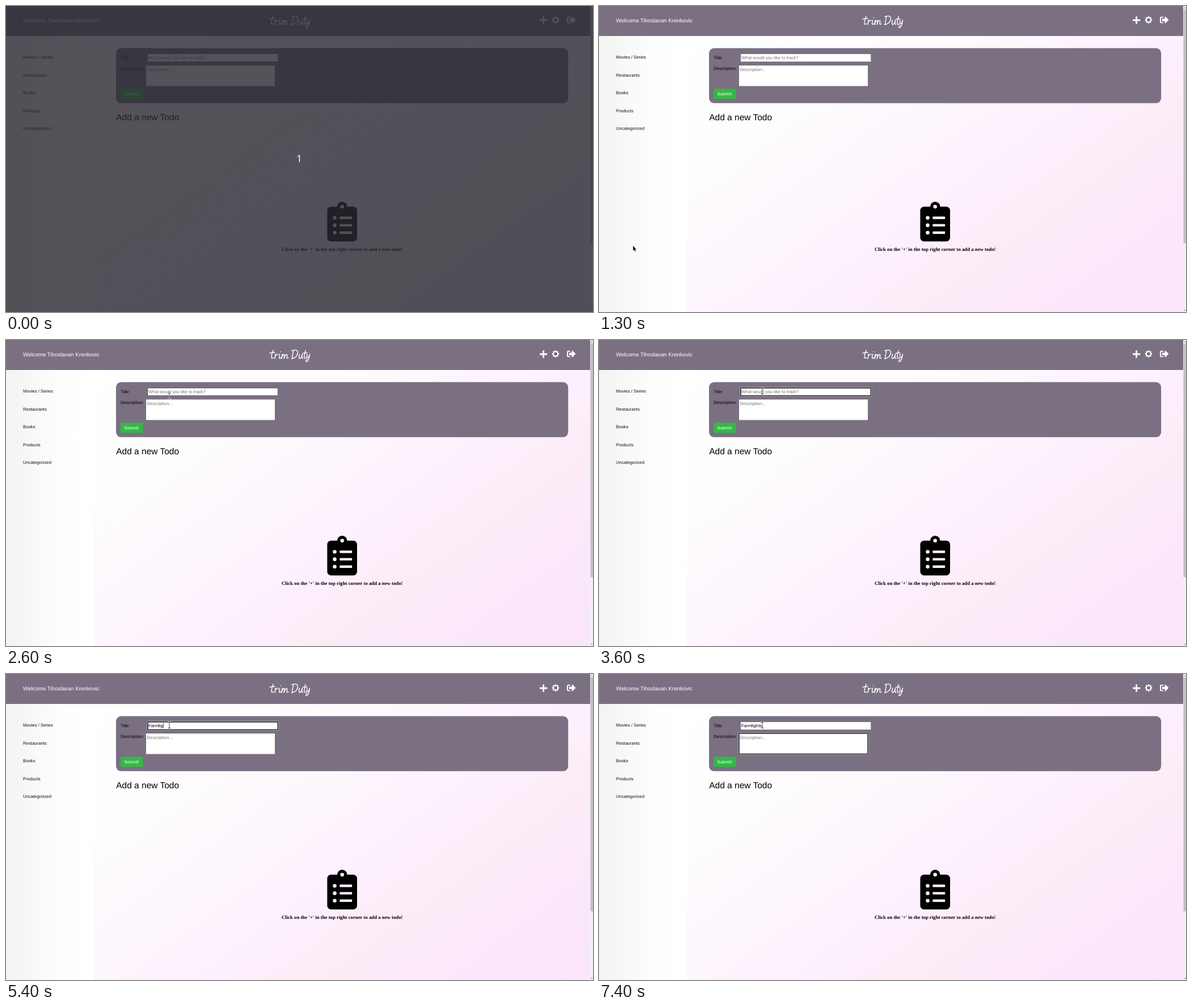
Animation of 1035 by 541 pixels, one loop 8000 ms. Source, as an HTML page with a canvas:

```html
<!DOCTYPE html>
<html lang="en">
<head>
<meta charset="utf-8">
<title>Todo form</title>
<style>
  html, body { margin: 0; width: 100%; height: 100%; overflow: hidden; }
  canvas { display: block; width: 1035px; height: 541px; }
</style>
</head>
<body>
<canvas id="stage" role="img" aria-label="trim Duty: adding a new todo"></canvas>
<script>
const W = 1035, H = 541, LOOP = 8000, STEP = 100;
const SANS = '"Liberation Sans", Arial, sans-serif';
const SERIF = '"Liberation Serif", "Times New Roman", serif';
const PURPLE = '#7a7082';
const BODY = 7.76;

const canvas = document.getElementById('stage');
const ctx = canvas.getContext('2d');
const dpr = window.devicePixelRatio || 1;
canvas.width = Math.round(W * dpr);
canvas.height = Math.round(H * dpr);

const field = { x: 250, y: 85, w: 229.3, h: 13.3 };
const area = { x: 247, y: 105.2, w: 227, h: 36.2 };
const title = 'Farmlights';
const keyTimes = [4300, 4600, 4700, 4900, 5100, 5200, 5400, 5900, 6100, 6300];
const FOCUS = 2900, TAB = 6900;

// Pointer path: time, x, y
const pointer = [
  [1300, 60, 424], [1400, 204, 420], [1500, 194, 418], [1600, 194, 418],
  [1900, 211, 321], [2000, 211, 321], [2600, 288, 99], [2900, 288, 90.5]
];

const wordmark = [
  'M471 18Q468 26 468 31Q469 34 472 31M465 23L474 22',
  'M475 25Q475 29 474 33M475 28Q478 24 480 25.5',
  'M482.5 25Q481 31 482 32.5Q483 33 484.5 31M484 20.5l.3 .3',
  'M487 25L485.8 33Q488 25 490.5 25.5Q491.5 27 490 33Q492.5 25 495 25.5Q496.5 27 495 31Q495 34 498 31.5',
  'M507 18Q505 26 504.5 33M504 19Q513 15.5 514.5 21Q514.5 31 503.5 33.2',
  'M517.5 25Q515.5 33 518 32.8Q521 32 522.5 25Q521 33 523.5 32.5',
  'M528 18.5Q525.5 28 526 31.5Q527 34 529 31.5M523.5 23.5L531 22.5',
  'M531 25Q529.5 32 532 31.5Q534.5 30 535.5 25Q534 37 530 38.5Q527 38 531 34'
].map(d => new Path2D(d));

const arrow = new Path2D('M0 0V8.6L2 6.8L3.5 10L4.9 9.4L3.4 6.3H6Z');
const beam = new Path2D('M-1.8 -5H1.8M0 -5V5M-1.8 5H1.8');
const exitIcon = new Path2D(
  'M497 273L329 441Q288 470 288 424V328H152Q128 328 128 304V208Q128 184 152 184H288V88Q288 42 329 71L497 239Q512 256 497 273Z' +
  'M180 448Q192 448 192 436V396Q192 384 180 384H96Q64 384 64 352V160Q64 128 96 128H180Q192 128 192 116V76Q192 64 180 64H96Q0 64 0 160V352Q0 448 96 448Z');

function clipboardPath() {
  const p = new Path2D('M48 64H128A64 64 0 0 1 256 64H336A48 48 0 0 1 384 112V464A48 48 0 0 1 336 512H48A48 48 0 0 1 0 464V112A48 48 0 0 1 48 64Z');
  const hole = (x, y) => { p.moveTo(x + 24, y); p.arc(x, y, 24, 0, 7); p.closePath(); };
  hole(192, 64);
  for (const y of [208, 304, 400]) {
    hole(96, y);
    p.roundRect(160, y - 16, 160, 32, 8);
  }
  return p;
}
const clipboard = clipboardPath();

function text(str, x, y, size = BODY, color = '#000', family = SANS, weight = '') {
  ctx.font = `${weight} ${size}px ${family}`;
  ctx.fillStyle = color;
  ctx.fillText(str, x, y);
}

function rect(x, y, w, h, color, r = 0) {
  ctx.fillStyle = color;
  ctx.beginPath();
  ctx.roundRect(x, y, w, h, r);
  ctx.fill();
}

function gradient(x0, y0, x1, y1, stops) {
  const g = ctx.createLinearGradient(x0, y0, x1, y1);
  stops.forEach(([at, color]) => g.addColorStop(at, color));
  return g;
}

function placed(x, y, scale, draw) {
  ctx.save();
  ctx.translate(x, y);
  ctx.scale(scale, scale);
  draw();
  ctx.restore();
}

function drawBackground() {
  rect(0, 0, W, H, gradient(287, -44, 897, 790, [
    [0, '#ffffff'], [0.25, '#fefbfd'], [0.5, '#fdf0fe'],
    [0.6, '#fcecf6'], [0.75, '#fbe7fb'], [1, '#fae3fc']
  ]));
  rect(0, 53, 155, H - 53, gradient(0, 0, 155, 0, [
    [0, '#f3f4f2'], [0.65, '#fefefd'], [1, '#ffffff']
  ]));
}

function drawGear(x, y) {
  ctx.save();
  ctx.translate(x, y);
  ctx.lineCap = 'butt';
  ctx.lineWidth = 2;
  ctx.beginPath();
  ctx.arc(0, 0, 4, 0, 7);
  ctx.stroke();
  ctx.lineWidth = 2.3;
  for (let i = 0; i < 8; i++) {
    ctx.beginPath();
    ctx.moveTo(0, -4.2);
    ctx.lineTo(0, -6.3);
    ctx.stroke();
    ctx.rotate(Math.PI / 4);
  }
  ctx.restore();
}

function drawHeader() {
  rect(0, 0, 1030, 53, PURPLE);
  text('Welcome Tihoslavan Krenkovic', 30, 28.7, 9.72, '#fff');
  ctx.strokeStyle = '#fff';
  ctx.lineWidth = 1.4;
  ctx.lineCap = ctx.lineJoin = 'round';
  wordmark.forEach(p => ctx.stroke(p));
  rect(941, 23.5, 13.4, 2.9, '#fff', 0.9);
  rect(946.2, 18.3, 2.9, 13.4, '#fff', 0.9);
  drawGear(969, 24.6);
  placed(989, 16.8, 0.0303, () => ctx.fill(exitIcon));
}

function drawScrollbar() {
  rect(1030, 0, 5, H, '#f1f1f1');
  rect(1030.5, 6, 4.5, 413.5, '#c1c1c1');
  ctx.fillStyle = '#505050';
  ctx.fill(new Path2D('M1031.3 4L1032.7 2.4L1034.1 4ZM1031.3 537.5L1032.7 539.1L1034.1 537.5Z'));
}

function drawBox(b, focused, hovered) {
  if (focused) {
    rect(b.x - 1.4, b.y - 1.4, b.w + 2.8, b.h + 2.8, '#fff', 2);
    rect(b.x - 0.9, b.y - 0.9, b.w + 1.8, b.h + 1.8, '#101014', 1.5);
    rect(b.x + 0.6, b.y + 0.6, b.w - 1.2, b.h - 1.2, '#fff', 0.5);
    return;
  }
  rect(b.x, b.y, b.w, b.h, '#fff');
  if (hovered) {
    ctx.strokeStyle = '#333';
    ctx.lineWidth = 0.6;
    ctx.strokeRect(b.x, b.y, b.w, b.h);
  }
}

function drawCaret(x, y) {
  rect(x, y, 0.7, 9, '#000');
}

function drawForm(t) {
  const inTitle = t >= FOCUS && t < TAB;
  const inArea = t >= TAB;
  const typed = title.slice(0, keyTimes.filter(k => t >= k).length);

  rect(194, 74.5, 797.2, 97.3, PURPLE, 9);
  text('Title:', 202, 94);
  text('Description:', 202, 113);
  drawBox(field, inTitle, t >= 2600 && t < FOCUS);
  drawBox(area, inArea);
  if (typed) text(typed, 251, 94);
  else text('What would you like to track?', 251, 94, BODY, '#757575');
  text('Description...', 248.5, 114.8, BODY, '#757575');

  if (inTitle && (t < 3600 || t >= 4200)) {
    ctx.font = `${BODY}px ${SANS}`;
    drawCaret(251.1 + ctx.measureText(typed).width, 87);
  }
  if (inArea && t < 7400) drawCaret(248.2, 108);

  rect(202, 146.3, 39.6, 18, '#33b846', 2.5);
  text('Submit!', 208.2, 158, BODY, '#fff');
}

function drawPage(t) {
  drawBackground();
  drawHeader();
  ['Movies / Series', 'Restaurants', 'Books', 'Products', 'Uncategorized']
    .forEach((label, i) => text(label, 30, 93 + 31.5 * i, BODY, '#111'));
  drawForm(t);
  text('Add a new Todo', 194.2, 202.4, 15.5);
  placed(566.4, 346, 0.137, () => ctx.fill(clipboard, 'evenodd'));
  ctx.textAlign = 'center';
  text("Click on the '+' in the top right corner to add a new todo!", 592.7, 433, 8.76, '#000', SERIF, 'bold');
  ctx.textAlign = 'left';
  drawScrollbar();
}

function pointerAt(t) {
  const next = pointer.findIndex(p => p[0] > t);
  if (next < 0) return pointer[pointer.length - 1].slice(1);
  const [t0, x0, y0] = pointer[next - 1];
  const [t1, x1, y1] = pointer[next];
  const k = (t - t0) / (t1 - t0);
  return [x0 + (x1 - x0) * k, y0 + (y1 - y0) * k];
}

function drawPointer(t) {
  if (t < pointer[0][0]) return;
  const [x, y] = pointerAt(t);
  placed(x, y, 1, () => {
    ctx.strokeStyle = '#fff';
    ctx.lineCap = 'square';
    if (y < 142) {
      ctx.lineWidth = 1.8;
      ctx.stroke(beam);
      ctx.lineWidth = 0.8;
      ctx.strokeStyle = '#111';
      ctx.stroke(beam);
    } else {
      ctx.lineWidth = 1.2;
      ctx.stroke(arrow);
      ctx.fillStyle = '#111';
      ctx.fill(arrow);
    }
  });
}

function drawCountdown() {
  rect(0, 0, W, H, 'rgba(41, 41, 48, 0.8)');
  ctx.textAlign = 'center';
  text('1', 517, 276.3, 17.5, '#fff', '"Noto Sans", "Open Sans", sans-serif');
  ctx.textAlign = 'left';
}

const start = performance.now();

function render() {
  const elapsed = (performance.now() - start) % LOOP;
  const t = Math.floor(elapsed / STEP) * STEP;
  ctx.setTransform(dpr, 0, 0, dpr, 0, 0);
  ctx.textRendering = 'geometricPrecision';
  drawPage(t);
  drawPointer(t);
  if (t < 100) drawCountdown();
  requestAnimationFrame(render);
}
render();
</script>
</body>
</html>
```
